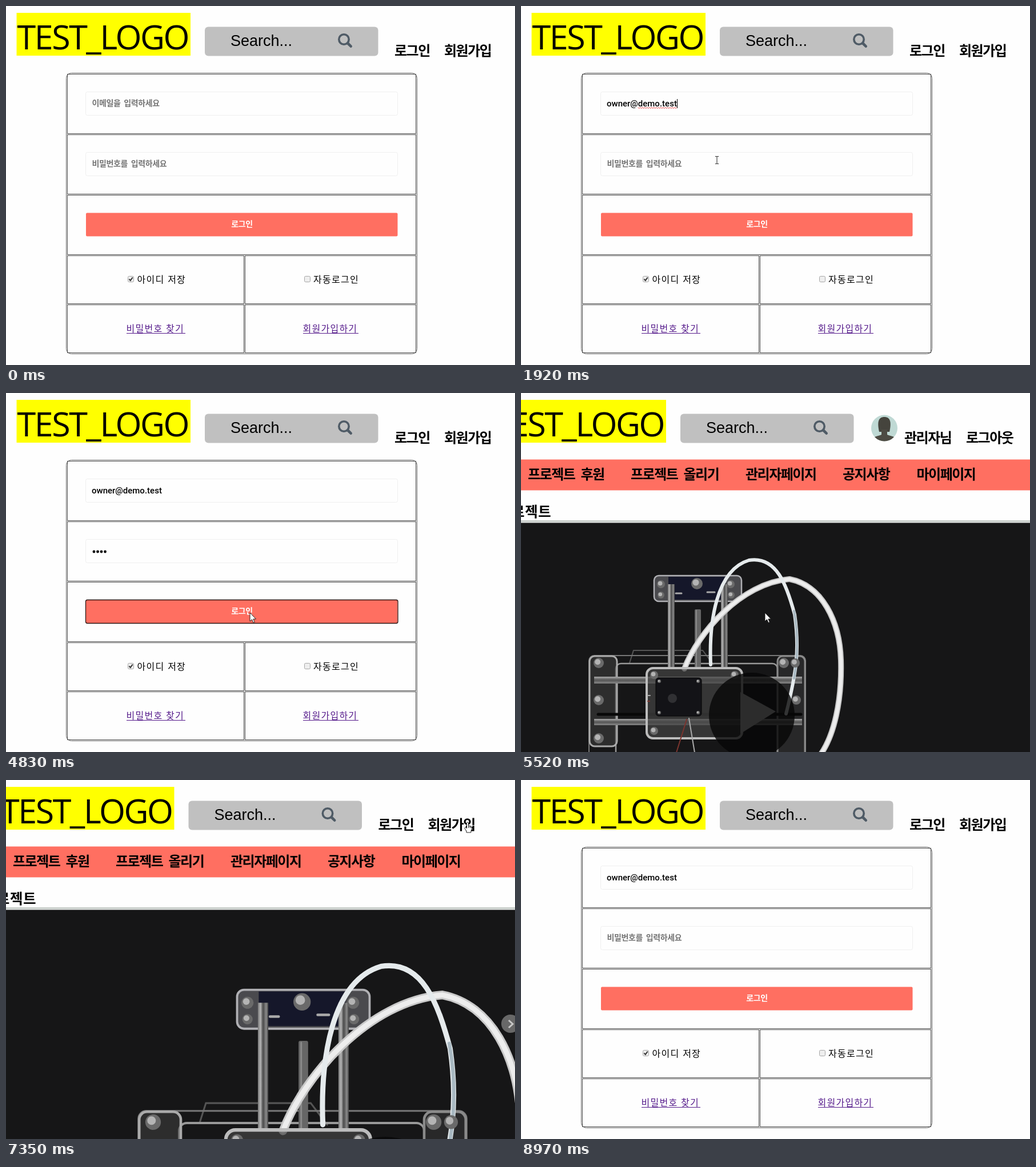
An HTML page that plays this animation: 891x629 px, repeating every 9450 ms.

```html
<!DOCTYPE html>
<html lang="ko">
<head>
<meta charset="utf-8">
<title>Login</title>
<style>
html, body { margin: 0; width: 100%; height: 100%; overflow: hidden; background: #fefefe; }
svg { display: block; width: 100%; height: 100%; }
text { font-family: "Noto Sans CJK KR", "Noto Sans KR", "Noto Sans CJK SC", "Noto Sans CJK", sans-serif; white-space: pre; }
.big { font-size: 24px; font-weight: 700; letter-spacing: -1.5px; word-spacing: 5px; }
.small { font-size: 14px; font-weight: 700; letter-spacing: -.35px; word-spacing: 2px; }
.title { font-size: 24.5px; font-weight: 700; letter-spacing: .5px; }
.hint { fill: #757575; }
.label { font-size: 16px; font-weight: 300; letter-spacing: 1.25px; }
.link { fill: #551a8b; }
.logo { font: 59px "Open Sans", "Noto Sans", sans-serif; letter-spacing: -2.4px; }
.search { font: 27px "Liberation Sans", Arial, sans-serif; }
.mail { font: 500 15px Roboto, sans-serif; }
.option { font: 13px "Liberation Sans", Arial, sans-serif; fill: #333; }
.cell { fill: none; stroke: #4a4a4a; }
.field { fill: #fefefe; stroke: #efefef; }
</style>
</head>
<body>
<svg id="stage" viewBox="0 0 891 629">
  <defs>
    <linearGradient id="rod">
      <stop offset="0" stop-color="#777"/><stop offset=".25" stop-color="#b5b5b5"/>
      <stop offset=".5" stop-color="#4a4a4a"/><stop offset=".8" stop-color="#8a8a8a"/>
      <stop offset="1" stop-color="#444"/>
    </linearGradient>
    <linearGradient id="bar" x2="0" y2="1">
      <stop offset="0" stop-color="#aaa"/><stop offset=".5" stop-color="#555"/><stop offset="1" stop-color="#888"/>
    </linearGradient>
    <clipPath id="frame"><rect y="227.500" width="891" height="402"/></clipPath>
    <clipPath id="face"><circle cx="636" cy="61.500" r="23"/></clipPath>
    <path id="hose" d="M286 483C310 420 385 333 470 326C527 337 558 400 560 468C562 540 548 600 524 634"/>
  </defs>
  <rect width="891" height="629" fill="#fefefe"/>

  <g id="home">
    <rect y="116.500" width="891" height="54" fill="#ff6f61"/>
    <g id="menu" class="big"></g>
    <text class="title" x="53" y="217" text-anchor="end">프로젝트</text>
    <rect y="223" width="891" height="3" fill="#c9cfcb"/>
    <rect y="226" width="891" height="2" fill="#e6e9e7"/>
    <g clip-path="url(#frame)">
      <rect y="227" width="891" height="402" fill="#161617"/>
      <g id="photo" fill="none" stroke-linecap="round">
        <path d="M190 473L197 451H318L337 476" stroke="#555" stroke-width="2"/>
        <rect x="119" y="460" width="379" height="190" rx="9" stroke="#777" stroke-width="2"/>
        <rect x="166" y="474" width="283" height="170" rx="9" stroke="#999" stroke-width="2.500"/>
        <rect x="120" y="461" width="48" height="158" rx="9" fill="#444" fill-opacity=".5" stroke="#aaa" stroke-width="3"/>
        <rect x="449" y="461" width="48" height="180" rx="9" fill="#444" fill-opacity=".4" stroke="#8a8a8a" stroke-width="3"/>
        <rect x="128" y="497" width="364" height="12" fill="url(#bar)"/>
        <rect x="128" y="571" width="364" height="11" fill="url(#bar)"/>
        <path d="M135 563H490" stroke="#080808" stroke-width="5"/>
        <rect x="233" y="320" width="153" height="45" rx="8" fill="#4a4a4e" stroke="#b0b0b4" stroke-width="2.500"/>
        <rect x="258" y="322" width="100" height="40" fill="#15172a"/>
        <path d="M271 351h10M326 349h13" stroke="#aaa" stroke-width="3"/>
        <rect x="257" y="335" width="12" height="145" fill="url(#rod)"/>
        <rect x="350" y="335" width="12" height="145" fill="url(#rod)"/>
        <rect x="304" y="379" width="11" height="104" rx="2" fill="#666"/>
        <path d="M307 381V482" stroke="#8a8a8a" stroke-width="2"/>
        <use href="#hose" stroke="#c9c9c9" stroke-width="10"/>
        <use href="#hose" stroke="#ededed" stroke-width="6"/>
        <path d="M332 476C329 400 342 310 399 293C447 285 465 336 479 388C488 450 482 490 464 562" stroke="#e5eaec" stroke-width="6"/>
        <path d="M478 382C486 425 484 465 478 500" stroke="#a9b9c2" stroke-width="4"/>
        <rect x="220" y="482" width="167" height="123" rx="11" fill="#444" fill-opacity=".7" stroke="#bcbcbc" stroke-width="4"/>
        <rect x="236" y="499" width="80" height="67" rx="5" fill="#131317" stroke="#050505"/>
        <circle cx="265" cy="535" r="8" fill="#303033"/>
        <path d="M222 540h3M290 572L272 630" stroke="#7c342e" stroke-width="2"/>
        <path d="M222 530h4M294 570L304 630" stroke="#aaa" stroke-width="2"/>
        <g id="screws"></g>
        <circle cx="404" cy="565" r="75" fill="#070707" fill-opacity=".8"/>
        <path d="M384 524L446 558L384 597Z" fill="#2c2c2c"/>
      </g>
      <g id="next">
        <circle cx="883" cy="427" r="16" fill="#686868"/>
        <path d="M880 421L887 427.500L880 434" fill="none" stroke="#c8c8c8" stroke-width="3"/>
      </g>
    </g>
  </g>

  <g id="login">
    <rect x="105.500" y="117.500" width="614" height="492" rx="9" fill="none" stroke="#666"/>
    <g id="cells" class="cell"></g>
    <rect class="field" x="139.500" y="150.500" width="546" height="41" rx="3"/>
    <rect class="field" x="139.500" y="256.500" width="546" height="41" rx="3"/>
    <text id="mailHint" class="small hint" x="150.500" y="175">이메일을 입력하세요</text>
    <text id="mail" class="mail" x="150" y="175.500">owner@demo.test</text>
    <path id="squiggle" fill="none" stroke="#e33" stroke-width="1"/>
    <text id="passHint" class="small hint" x="150.500" y="281">비밀번호를 입력하세요</text>
    <g id="dots"></g>
    <rect id="caret" width="1" height="16"/>
    <rect x="140" y="362.500" width="545.500" height="41" rx="2" fill="#ff6f61"/>
    <rect id="ring" x="139.500" y="362.500" width="546.500" height="41" rx="3" fill="none" stroke="#2b1513" stroke-width="1.300"/>
    <text class="small" x="413" y="387" text-anchor="middle" fill="#fff">로그인</text>
    <g fill="#eee" stroke="#a6a6a6">
      <rect x="213.500" y="473.500" width="10" height="10" rx="2"/>
      <rect x="522.500" y="473.500" width="10" height="10" rx="2"/>
    </g>
    <path d="M215.500 478.500L217.800 481L221.700 475.500" fill="none" stroke="#333" stroke-width="2"/>
    <text class="label" x="229.500" y="485">아이디 저장</text>
    <text class="label" x="538" y="485">자동로그인</text>
    <text class="label link" x="210.500" y="571">비밀번호 찾기</text>
    <text class="label link" x="519.500" y="571">회원가입하기</text>
    <path d="M211 573.500H314M520 573.500H617" stroke="#551a8b"/>
    <g id="list"></g>
  </g>

  <g id="header">
    <rect x="18.500" y="12" width="304.500" height="75" fill="#ff0"/>
    <text class="logo" x="19.500" y="75.500">TEST_LOGO</text>
    <rect x="348" y="36.500" width="303.500" height="51" rx="6" fill="#c0c0c0"/>
    <text class="search" x="393" y="70">Search...</text>
    <g fill="none" stroke="#4f5b66">
      <circle cx="591.500" cy="58.500" r="8.700" stroke-width="3.600"/>
      <path d="M598.500 65.500L603.700 70.700" stroke-width="4.600" stroke-linecap="round"/>
    </g>
    <g id="guest" class="big">
      <text x="680" y="87">로그인</text>
      <text x="767" y="87">회원가입</text>
    </g>
  </g>
  <g id="member" class="big">
    <g clip-path="url(#face)">
      <rect x="613" y="38" width="46" height="47" fill="#bfd9d4"/>
      <path d="M627 68C623 50 626 42 636 42C646 42 649 50 645 68Z" fill="#45443d"/>
      <path d="M612 86C614 76 624 76 631 73V64H641V73C648 76 658 76 660 86Z" fill="#4d4b43"/>
    </g>
    <text x="671" y="87">관리자님</text>
    <text x="779" y="87">로그아웃</text>
  </g>

  <g id="cursor" stroke-linejoin="round">
    <path id="arrow" d="M0 0V15L3.500 11.800L6 17.500L8.300 16.500L5.900 11H10.500Z" fill="#fff" stroke="#111" stroke-width=".9"/>
    <path id="beam" d="M-3-6.500H-.8L0-6L.8-6.500H3M0-6V6M-3 6.500H-.8L0 6L.8 6.500H3" fill="none" stroke="#222"/>
    <g id="hand" stroke="#111" stroke-width=".9">
      <path d="M-1.500 1.500C-1.500-.4 1.500-.4 1.500 1.500V6L4 6.500L6 7.300L7.500 8.500V12L6 15V18H-2V15.500L-5 11C-5.500 9-3.500 8.500-1.500 10.500Z" fill="#fff"/>
      <path d="M1.500 6V10M4 6.500V10M6 7.500V10" fill="none"/>
    </g>
  </g>
</svg>
<script>
const LOOP = 9450, STEP = 30;
const HOME_AT = 5460, LOGOUT_AT = 7350, LOGIN_AT = 8340;
const FILL_AT = 1530, LIST_AT = 690, CLICK_AT = 4740;
const keys = [3060, 3150, 3270, 3360];

const el = {};
document.querySelectorAll('[id]').forEach(e => el[e.id] = e);
const show = (e, on) => e.style.display = on ? '' : 'none';
const within = (v, a, b) => v >= a && v < b;

// Pointer waypoints: time, x, y
const track = [
  [150, 794, 66], [420, 385, 178], [570, 385, 178], [720, 325, 200],
  [1710, 325, 200], [1920, 343, 270], [2010, 345, 288], [2400, 345, 288],
  [2490, 345, 272], [3780, 345, 272], [3840, 347, 290], [3900, 375, 320],
  [3960, 403, 350], [4020, 417, 395], [4260, 417, 395], [4410, 415, 392],
  [4530, 415, 392], [4680, 427, 385], [5550, 427, 385], [5760, 575, 290],
  [6000, 730, 184], [6090, 758, 168], [6210, 806, 98], [6360, 799, 74],
  [6600, 799, 74], [6660, 807, 74], [6990, 807, 74], [7050, 808, 74],
  [7680, 808, 74], [7950, 745, 66], [8280, 688, 73], [8760, 688, 73],
  [8880, 832, 30], [8970, 891, 0]
];

function pointer(t) {
  const i = track.findIndex(p => p[0] > t);
  if (i < 1) return null;
  const [a, b] = [track[i - 1], track[i]];
  const k = (t - a[0]) / (b[0] - a[0]);
  return [a[1] + (b[1] - a[1]) * k, a[2] + (b[2] - a[2]) * k];
}

function shape(x, y, login, member, shift) {
  const links = member ? [[671, 754], [780, 862]] : [[681 + shift, 742 + shift], [768 + shift, 850 + shift]];
  if (within(y, 62, 93) && links.some(([a, b]) => within(x, a, b))) return 'hand';
  const field = within(x, 140, 686) && (within(y, 150, 192) || within(y, 256, 298));
  return login && field ? 'beam' : 'arrow';
}

function caretAt(t) {
  if (within(t, 570, 1080)) return [150, 163];
  if (within(t, FILL_AT, 2010)) return [mailEnd, 163];
  if (within(t, 2190, 2670)) return [150, 269];
  if (within(t, keys[0], 3870) || within(t, 4380, CLICK_AT))
    return [151 + 6.5 * keys.filter(k => t >= k).length, 269];
  return null;
}

function build() {
  const rect = (x, y, w, h) => `<rect x="${x}" y="${y}" width="${w}" height="${h}"/>`;
  el.cells.innerHTML =
    [119.5, 225.5, 331.5].map(y => rect(107.5, y, 610, 104)).join('') +
    [437.5, 523.5].map(y => rect(107.5, y, 309, 84) + rect(418.5, y, 299, 84)).join('');

  el.menu.innerHTML = [[12, '프로젝트 후원'], [192, '프로젝트 올리기'], [393, '관리자페이지'],
    [563, '공지사항'], [692.5, '마이페이지']]
    .map(([x, s]) => `<text x="${x}" y="151">${s}</text>`).join('');

  el.dots.innerHTML = keys.map((k, i) => `<circle cx="${154 + 6.5 * i}" cy="278" r="2.4"/>`).join('');

  const screws = [[245, 335, 7], [245, 354, 6], [308, 334, 10], [367, 335, 7], [368, 354, 6],
    [136, 473, 9], [136, 538, 9], [136, 605, 9], [460, 473, 9], [480, 473, 8], [482, 538, 8],
    [233, 494, 7], [374, 494, 7], [233, 592, 7], [242, 505, 3], [310, 505, 3], [242, 560, 3], [310, 560, 3]];
  el.screws.innerHTML = screws.map(([x, y, r]) =>
    `<circle cx="${x}" cy="${y}" r="${r}" fill="#6a6a6a"/>` +
    `<circle cx="${x - r * .2}" cy="${y - r * .2}" r="${r * .55}" fill="#b4b4b4"/>`).join('');

  const names = ['owner', 'guest', 'buyer', 'maker', 'tester', 'member', 'sample'];
  el.list.innerHTML =
    '<rect x="138" y="192" width="196" height="238" fill="#ddd"/>' +
    '<rect x="139" y="192" width="194" height="237" fill="#fff"/>' +
    '<rect x="139" y="195" width="194" height="33" fill="#eee"/>' +
    names.map((n, i) => `<text class="option" x="150" y="${216 + 33 * i}">${n}@demo.test</text>`).join('');

  let wave = '';
  const start = el.mail.getStartPositionOfChar(6).x;
  for (let x = start, i = 0; x < mailEnd; x += 2, i++)
    wave += `${i ? 'L' : 'M'}${x} ${i % 2 ? 179.5 : 177.5}`;
  el.squiggle.setAttribute('d', wave);
}

function draw(t) {
  const login = t < HOME_AT || t >= LOGIN_AT;
  const member = within(t, HOME_AT, LOGOUT_AT);
  const shift = login ? 0 : member ? -69 : -28.5;
  const typed = login && t < HOME_AT ? keys.filter(k => t >= k).length : 0;

  show(el.login, login);
  show(el.home, !login);
  show(el.guest, !member);
  show(el.member, member);
  el.header.setAttribute('transform', `translate(${shift})`);

  show(el.mailHint, t < FILL_AT);
  show(el.mail, t >= FILL_AT);
  show(el.squiggle, within(t, FILL_AT, 2190));
  show(el.list, within(t, LIST_AT, FILL_AT));
  show(el.passHint, !typed);
  [...el.dots.children].forEach((d, i) => show(d, i < typed));
  show(el.ring, within(t, CLICK_AT, HOME_AT));

  const caret = caretAt(t);
  show(el.caret, caret);
  if (caret) {
    el.caret.setAttribute('x', caret[0]);
    el.caret.setAttribute('y', caret[1]);
  }

  el.photo.setAttribute('transform', member ? '' : 'matrix(1.516 0 0 1.516 51.3 -117.6)');
  el.next.setAttribute('opacity', Math.max(0, Math.min(1, (t - 5580) / 180)));

  const p = pointer(t);
  show(el.cursor, p);
  if (p) {
    const kind = shape(p[0], p[1], login, member, shift);
    ['arrow', 'beam', 'hand'].forEach(k => show(el[k], k === kind));
    el.cursor.setAttribute('transform', `translate(${p[0]} ${p[1]})`);
  }
}

const mailEnd = Math.round(150 + el.mail.getComputedTextLength());
build();
const begin = performance.now();
function tick() {
  const t = (performance.now() - begin) % LOOP;
  draw(Math.floor(t / STEP) * STEP);
  requestAnimationFrame(tick);
}
tick();
</script>
</body>
</html>
```
